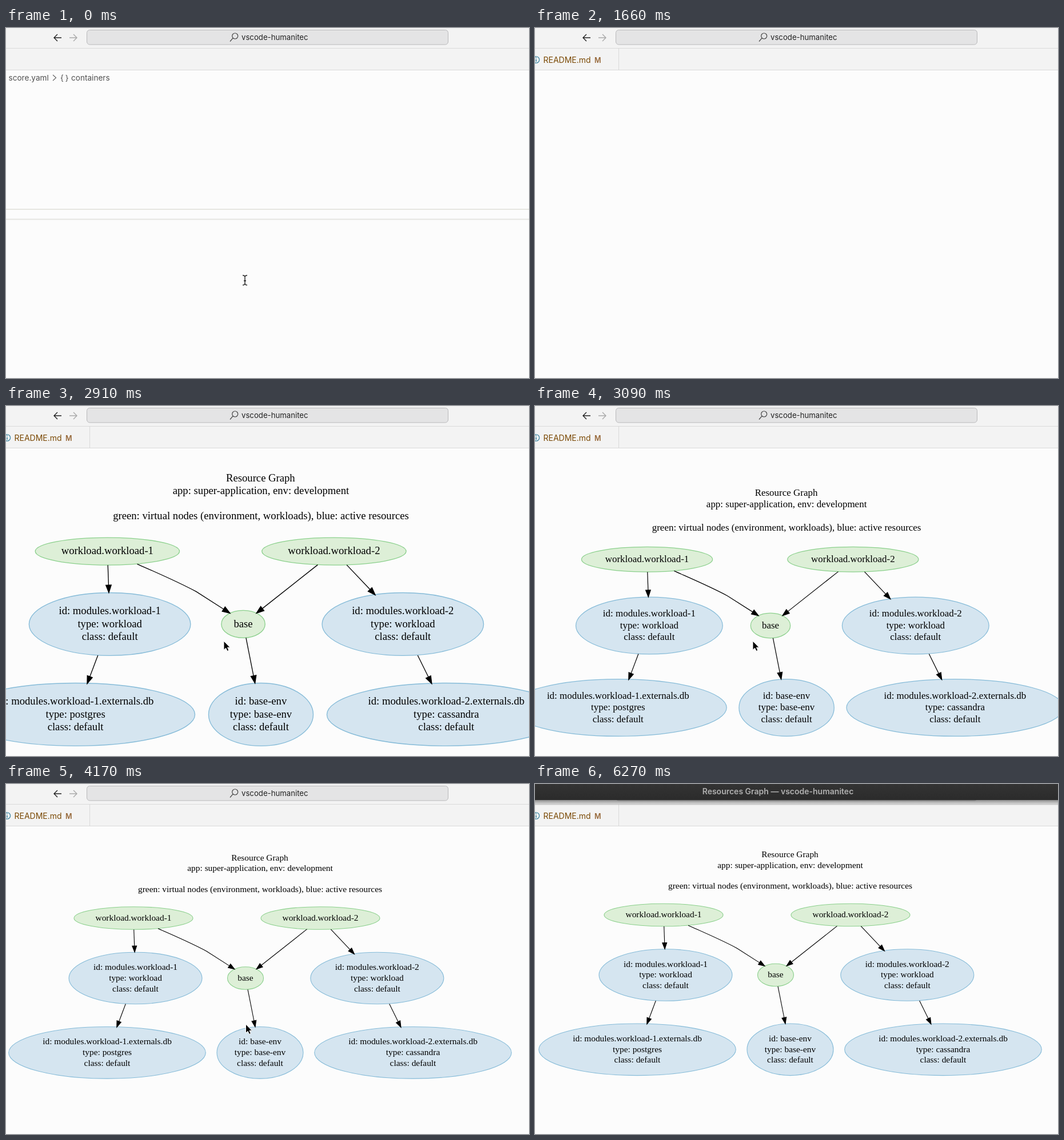
Recreate the animation shown at these times as an HTML page. Size 915x612 px, loop 6.29 s.

```html
<!DOCTYPE html>
<html lang="en">
<head>
<meta charset="utf-8">
<title>Resources Graph</title>
<style>
  html, body { margin: 0; width: 100%; height: 100%; overflow: hidden; background: #fcfcfc; }
  svg { display: block; font-family: Inter, Roboto, sans-serif; }
  #graph { font: 15.4px "Liberation Serif", serif; text-anchor: middle; }
  .green { fill: #ddefd7; stroke: #8bd08c; stroke-width: 1.1; }
  .blue { fill: #d5e5f0; stroke: #85bbd8; stroke-width: 1.1; }
  .edge { fill: none; stroke: #000; stroke-width: 1.1; }
  .line { fill: none; stroke-width: 1.4; }
</style>
</head>
<body>
<svg width="915" height="612" viewBox="0 0 915 612">
  <defs>
    <linearGradient id="shade" x2="0" y2="1">
      <stop offset="0" stop-opacity=".42"/>
      <stop offset="1" stop-opacity="0"/>
    </linearGradient>
    <linearGradient id="dark" x2="0" y2="1">
      <stop offset="0" stop-color="#373737"/>
      <stop offset="1" stop-color="#2b2b2b"/>
    </linearGradient>
  </defs>
  <rect width="915" height="612" fill="#fcfcfc"/>

  <g id="graph"></g>

  <rect width="915" height="74" fill="#f3f3f3"/>
  <path d="M0 35.5H915M0 73.5H915" stroke="#dadada"/>
  <rect x="141.5" y="3.5" width="632" height="25.5" rx="5" fill="#e4e4e5" stroke="#b9b9bb"/>
  <path class="line" d="M97 17H84M90 11L84 17L90 23" stroke="#222"/>
  <path class="line" d="M111 17H124M118 11L124 17L118 23" stroke="#aaa"/>
  <g class="line" stroke="#444" style="stroke-width:1.2">
    <circle cx="400.7" cy="14" r="5"/>
    <path d="M397 17.7L392 23.5"/>
  </g>
  <text x="412" y="21" font-size="13.2" fill="#222">vscode-humanitec</text>

  <g id="editor">
    <g font-size="13.6" fill="#505050">
      <text x="4.5" y="92">score.yaml</text>
      <text x="95" y="91.5" letter-spacing="3">{}</text>
      <text x="114" y="92">containers</text>
    </g>
    <path class="line" d="M82 82L87.500 87L82 92" stroke="#606060" style="stroke-width:1.1"/>
    <path d="M0 317H915M0 334.500H915" stroke="#e6e6e1" stroke-width="2"/>
    <path class="line" d="M414 432.500Q418 432.500 418 435.500Q418 432.500 422 432.500M418 435V447M414 449.500Q418 449.500 418 446.500Q418 449.500 422 449.500M416 442H420" stroke="#222"/>
  </g>

  <g id="tab">
    <path d="M146.500 36V73" stroke="#dadada"/>
    <circle class="line" cx="2" cy="55.500" r="5.600" stroke="#468ba6"/>
    <path d="M2 54.500V59M2 51.500V53" stroke="#468ba6" stroke-width="1.600"/>
    <text x="14.500" y="61" font-size="14" fill="#7b4a05">README.md</text>
    <text x="104" y="60.500" font-size="12.500" font-weight="600" fill="#956637">M</text>
  </g>

  <path id="pointer" d="M0 0V15.500L3.600 12.200L6.100 17.500L8.800 16.300L6.400 11.200H11Z" stroke="#fff"/>

  <g id="bar">
    <rect id="shadow" y="28" width="915" height="10" fill="url(#shade)"/>
    <rect y="-12" width="915" height="40" fill="url(#dark)"/>
    <text x="425" y="17.500" font-size="14" font-weight="600" fill="#b0b0b0" text-anchor="middle">Resources Graph — vscode-humanitec</text>
  </g>
</svg>
<script>
const $ = id => document.getElementById(id);
const LOOP = 6290;

const text = (x, y, s) => `<text x="${x}" y="${y}">${s}</text>`;

function node(color, x, y, rx, ...lines) {
  const ry = lines.length > 1 ? 45.3 : 19.8;
  const top = y + 4.3 - (lines.length - 1) * 9.35;
  return `<ellipse class="${color}" cx="${x}" cy="${y}" rx="${rx}" ry="${ry}"/>` +
    lines.map((s, i) => text(x, top + i * 18.7, s)).join("");
}

// Line or curve from (x, y), then an arrowhead ending at the tip
function edge(x, y, tipX, tipY, curve) {
  const [fromX, fromY] = curve ? curve.slice(-2) : [x, y];
  const angle = Math.atan2(tipY - fromY, tipX - fromX);
  const neckX = tipX - 11 * Math.cos(angle), neckY = tipY - 11 * Math.sin(angle);
  const bend = curve ? "C" + curve.join(" ") : "";
  return `<path class="edge" d="M${x} ${y}${bend}L${neckX} ${neckY}"/>
    <path class="edge" style="fill:#000" d="M0 0L-11 -3.9V3.9Z"
      transform="translate(${tipX} ${tipY}) rotate(${angle * 180 / Math.PI})"/>`;
}

const resource = (x, y, rx, id, type) =>
  node("blue", x, y, rx, "id: " + id, "type: " + type, "class: default");

$("graph").innerHTML = [
  text(446, 128, "Resource Graph"),
  text(446.5, 146.6, "app: super-application, env: development"),
  text(446.5, 183, "green: virtual nodes (environment, workloads), blue: active resources"),
  node("green", 225, 229, 104, "workload.workload-1"),
  node("green", 552, 229, 104, "workload.workload-2"),
  node("green", 421, 334, 31.5, "base"),
  resource(228.5, 334, 116.5, "modules.workload-1", "workload"),
  resource(651.3, 334, 116.5, "modules.workload-2", "workload"),
  resource(179, 464.3, 172.3, "modules.workload-1.externals.db", "postgres"),
  resource(446.5, 464.3, 75.5, "base-env", "base-env"),
  resource(714, 464.3, 172.3, "modules.workload-2.externals.db", "cassandra"),
  edge(225.7, 249, 227.1, 288.7),
  edge(268, 247.3, 402, 318.3, [293, 258.500, 325, 272, 353, 287, 366, 294, 380, 302.500, 389, 309.500].slice(0, 6)),
  edge(528.5, 248.4, 440, 318.3),
  edge(570.3, 248.6, 611.5, 292),
  edge(211.3, 379, 195.8, 420),
  edge(425, 353.8, 438, 419.3),
  edge(672.7, 379, 693, 420)
].join("");

// Linear interpolation through rows of [time, ...values]
function track(t, rows) {
  const i = rows.findIndex(r => r[0] > t);
  if (i === 0) return rows[0].slice(1);
  if (i < 0) return rows[rows.length - 1].slice(1);
  const a = rows[i - 1], b = rows[i], f = (t - a[0]) / (b[0] - a[0]);
  return a.slice(1).map((v, n) => v + (b[n + 1] - v) * f);
}

const zoom = [[2660, 1.316], [2810, 1.275], [3090, 1.102], [3190, 1.102], [3500, 1]];
const pan = [[3760, 0, 0], [4170, 9.8, -46.8], [4210, 9.8, -46.8], [4400, 11.8, -52.3]];
const pointer = [[3550, 381, 411], [3740, 410, 467], [3760, 410, 467], [4170, 419.5, 420],
  [4210, 419.5, 420], [4400, 421.5, 414.5], [4600, 421.5, 414.5], [4980, 430, 16], [5060, 432, -22]];
const slide = [[5300, 0], [5340, 1], [5700, 28]];

const show = (id, on) => $(id).style.display = on ? "" : "none";
const move = (id, x, y, k = 1) => $(id).setAttribute("transform", `translate(${x} ${y}) scale(${k})`);

function draw(t) {
  const ready = t >= 2240;
  show("editor", t < 1620);
  show("tab", t >= 1620);
  show("graph", ready);
  show("pointer", ready && t < 5060);
  show("bar", t >= 5300);

  // Zoom is anchored at the pointer; (421, 334) is the "base" node
  const [k] = track(t, zoom), [px, py] = track(t, pan);
  move("graph", 381.7 + 27.5 * k + px - 421 * k, 409.3 - 23 * k + py - 334 * k, k);
  move("pointer", ...track(t, pointer));

  const [drop] = track(t, slide);
  move("bar", 0, drop - 28);
  $("shadow").setAttribute("opacity", drop / 28);
}

const start = performance.now();
function frame() {
  draw((performance.now() - start) % LOOP);
  requestAnimationFrame(frame);
}
frame();
</script>
</body>
</html>
```
